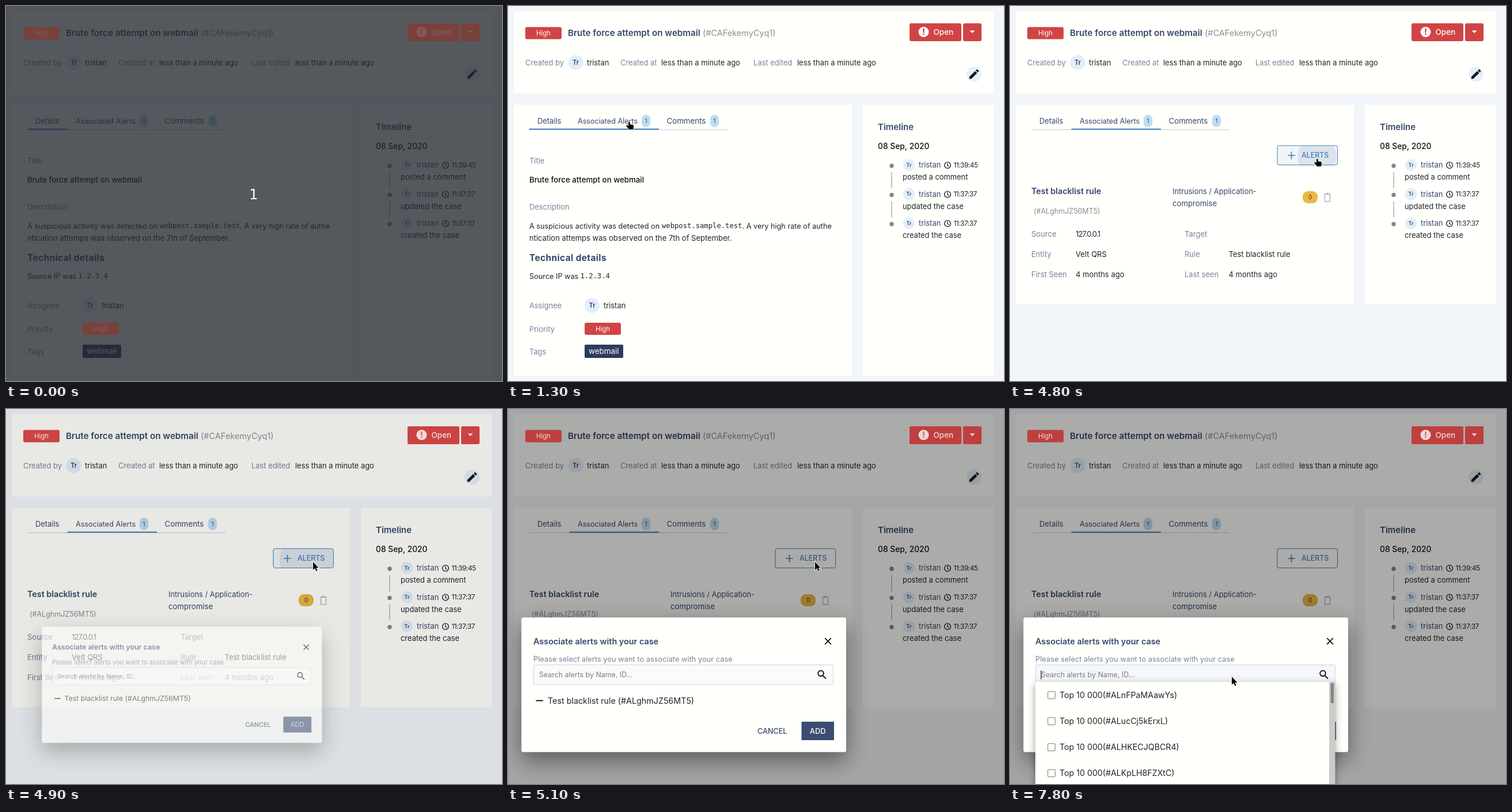
Write an HTML page with a canvas that moves like this. It is 861 px wide and 650 px high and loops after 8000 ms.

```html
<!DOCTYPE html>
<html lang="en">
<head>
<meta charset="utf-8">
<title>Case with associated alerts</title>
<style>
html, body { margin: 0; width: 100%; height: 100%; overflow: hidden; background: #f2f5f9 }
canvas { display: block }
</style>
</head>
<body>
<canvas id="stage" width="861" height="650"></canvas>
<script>
const c = document.getElementById('stage').getContext('2d');
const LOOP = 8000;
const NAVY = '#36476a', INK = '#20242c', GREY = '#78839a', BLUE = '#417fbf', RED = '#d04444',
      CARD = '#fffffc', PAGE = '#f2f5f9', USER = 'tristan', INITIALS = 'Tr';
const SANS = 'Inter, sans-serif', MONO = '"DejaVu Sans Mono", monospace';

const clamp = v => Math.min(1, Math.max(0, v));
const ramp = (t, from, to) => clamp((t - from) / (to - from));
const easeOut = p => 1 - (1 - p) ** 2;
const smooth = p => p * p * (3 - 2 * p);

// y is the middle of the capitals
function text(s, x, y, color = INK, size = 12.9, o = {}) {
  c.font = `${o.weight || 400} ${size}px ${o.font || SANS}`;
  c.letterSpacing = (o.spacing || 0) + 'px';
  c.textAlign = o.align || 'left';
  c.fillStyle = color;
  c.fillText(s, x, y + size * .36);
}
const centered = (s, x, y, color, size, weight) => text(s, x, y, color, size, { align: 'center', weight });

function box(x, y, w, h, fill, r = 0, stroke) {
  c.beginPath();
  c.roundRect(x, y, w, h, r);
  if (fill) { c.fillStyle = fill; c.fill(); }
  if (stroke) { c.strokeStyle = stroke; c.lineWidth = 1; c.stroke(); }
}
function disc(x, y, r, fill) {
  c.beginPath();
  c.arc(x, y, r, 0, 7);
  c.fillStyle = fill;
  c.fill();
}
function path(d, x, y, scale, fill, stroke, width = 1) {
  const p = new Path2D(d);
  c.save();
  c.translate(x, y);
  c.scale(scale, scale);
  if (stroke) { c.strokeStyle = stroke; c.lineWidth = width; c.stroke(p); }
  if (fill) { c.fillStyle = fill; c.fill(p); }
  c.restore();
}
function faded(alpha, draw) {
  if (alpha <= 0) return;
  c.save();
  c.globalAlpha *= alpha;
  draw();
  c.restore();
}
// a panel whose shadow falls only outside it, so it stays clean while translucent
function raised(x, y, w, h, r, blur, dy, alpha) {
  c.save();
  c.beginPath();
  c.rect(-400, -400, 1700, 1500);
  c.roundRect(x, y, w, h, r);
  c.clip('evenodd');
  c.shadowColor = `rgba(0,0,0,${alpha})`;
  c.shadowBlur = blur;
  c.shadowOffsetY = dy;
  box(x, y, w, h, CARD, r);
  c.restore();
  box(x, y, w, h, CARD, r);
}
function ripple(x, y, r, area, alpha) {
  faded(alpha, () => {
    c.beginPath();
    c.rect(...area);
    c.clip();
    disc(x, y, r, '#7890ad');
  });
}

function avatar(x, y, r) {
  disc(x, y, r, '#e2effa');
  centered(INITIALS, x, y, NAVY, r * .86, 600);
}
function badge(x, y) {
  box(x, y, 63, 21, RED, 3);
  centered('High', x + 31.5, y + 10.5, '#fff', 11.4);
}

function statusBits() {
  badge(30, 36.5);
  box(697, 30, 90, 31, RED, 3);
  box(790, 30, 32, 31, RED, 3);
  disc(721.5, 45, 9, '#fff');
  centered('!', 721.5, 45, RED, 14, 800);
  text('Open', 738.5, 45, '#fff', 13.5, { weight: 500 });
  path('M-4.5-2H4.5L0 2.6Z', 806, 44.5, 1, '#fff');
}

function header() {
  box(10, 9, 833, 143, CARD);
  statusBits();
  text('Brute force attempt on webmail', 104, 47, NAVY, 15.2, { weight: 600 });
  text('(#CAFekemyCyq1)', 338, 47, '#8b8e95', 14.5);
  text('Created by', 30, 98, GREY);
  avatar(117.5, 98, 13);
  text(USER, 137, 98);
  text('Created at', 195, 98, GREY);
  text('less than a minute ago', 266, 98);
  text('Last edited', 426, 98, GREY);
  text('less than a minute ago', 502, 98);
  disc(809, 118, 13, '#e4f0fa');
  path('M3 17.25V21h3.75L17.81 9.94 14.06 6.19ZM20.71 7.04a1 1 0 0 0 0-1.41l-2.34-2.34a1 1 0 0 0-1.41 0l-1.83 1.83 3.75 3.75Z',
    798, 107, .92, '#15181d');
}

function timeline(bottom) {
  box(616, 171, 227, bottom - 171, CARD);
  text('Timeline', 642, 210, NAVY, 15, { weight: 600 });
  text('08 Sep, 2020', 642, 243, '#111', 13.8, { weight: 500 });
  [['11:39:45', 'posted a comment'], ['11:37:37', 'updated the case'], ['11:37:37', 'created the case']]
    .forEach(([time, what], i) => {
      const y = 275.5 + i * 50.5;
      disc(666, y + 1.5, 3.7, '#85868a');
      if (i < 2) box(665.2, y + 12.5, 1.6, 28, '#b4b6ba');
      avatar(696, y, 10.3);
      text(USER, 713, y, NAVY);
      c.beginPath();
      c.arc(763, y + .5, 5.4, 0, 7);
      c.moveTo(763, y - 3);
      c.lineTo(763, y + 1);
      c.lineTo(765.5, y + 2.5);
      c.lineWidth = 1.4;
      c.strokeStyle = INK;
      c.stroke();
      text(time, 773.5, y, INK, 12, { spacing: -.55 });
      text(what, 685, y + 21);
    });
}

function tabs(t) {
  text('Details', 51, 199, NAVY);
  text('Associated Alerts', 121, 199, NAVY, 12.6);
  text('Comments', 275.5, 199, NAVY, 13.3);
  for (const x of [239.5, 358.5]) {
    box(x - 7.7, 188.5, 15.4, 21.5, '#bfddf3', 7.7);
    centered('1', x, 199, NAVY, 10);
  }
  box(37, 214, 344, 1, '#c3cddb');
  faded(1 - ramp(t, 1700, 2000), () => box(37, 212.5, 69.5, 2, BLUE));
  faded(ramp(t, 1100, 1300), () => box(106.5, 212.5, 155.5, 2, BLUE));
  if (t >= 1800) ripple(212, 204, 20 + (t - 1800) * .3, [107, 185, 155, 27], .2 * (1 - ramp(t, 1800, 2300)));
}

function details() {
  text('Title', 37, 268, GREY);
  text('Brute force attempt on webmail', 37, 301, '#111', 13.3, { weight: 500 });
  text('Description', 37, 348, GREY);
  text('A suspicious activity was detected on', 37, 381, INK, 12.7);
  text('webpost.sample.test', 267, 381, INK, 12.2, { font: MONO });
  text('. A very high rate of authe', 406.5, 381, INK, 12.7);
  text('ntication attemps was observed on the 7th of September.', 37, 402, INK, 13);
  text('Technical details', 37, 436, NAVY, 15.5, { weight: 700, spacing: .35 });
  text('Source IP was', 37, 468, INK, 12.7);
  text('1.2.3.4', 125.5, 468, INK, 12.2, { font: MONO });
  text('Assignee', 37, 519, GREY);
  avatar(146, 519, 13);
  text(USER, 166, 519);
  text('Priority', 37, 560, GREY);
  badge(133, 549);
  text('Tags', 37, 599, GREY);
  box(133, 587, 67, 23, '#2d3b5c', 2);
  text('webmail', 140, 598.5, '#fff', 13.4);
}

function alertsButton(t) {
  const hover = t >= 4400 && t < 5100;
  box(464, 242, 104.5, 33.5, hover ? '#f3f4f7' : CARD, 3, BLUE);
  if (t >= 4700)
    ripple(533, 261, 10 + ramp(t, 4700, 5000) * 72, [464.5, 242.5, 103.5, 32.5], .17 * (1 - ramp(t, 4900, 5100)));
  path('M-6.5 0H6.5M0-6.5V6.5', 488.5, 259, 1, null, BLUE, 1.7);
  text('ALERTS', 506, 259, BLUE, 12.4, { weight: 500 });
}

function alerts(t) {
  alertsButton(t);
  text('Test blacklist rule', 37, 321, NAVY, 14.3, { weight: 600 });
  text('(#ALghmJZ56MT5)', 41, 355.5, '#8b8e95', 12.5);
  text('Intrusions / Application-', 282, 321, NAVY);
  text('compromise', 282, 342, NAVY, 13.2);
  box(508, 321, 26, 21, '#e8b944', 9);
  centered('0', 521, 331.5, '#4a3a10', 10.5);
  path('M-4.5-4.5V7H4.5V-4.5M-6-5.5H6M-2.5-7H2.5', 551, 331.8, 1, null, '#b5b8be', 1.5);
  const rows = [
    ['Source', '127.0.0.1', 'Target', ''],
    ['Entity', 'Velt QRS', 'Rule', 'Test blacklist rule'],
    ['First Seen', '4 months ago', 'Last seen', '4 months ago']
  ];
  rows.forEach((row, i) => row.forEach((s, j) =>
    text(s, [37, 114, 303, 379.5][j], 395.5 + i * 34.7, j % 2 ? INK : GREY, 13,
      { spacing: s === '127.0.0.1' ? -.8 : 0 })));
}

function dialog(t) {
  const e = easeOut(ramp(t, 4800, 5100)), s = .69 + .31 * e;
  faded(e, () => {
    c.translate(305.5, 478.5);
    c.scale(s, s);
    c.translate(-305.5, -478.5);
    raised(23.5, 361.5, 563.5, 233, 3, 38, 15, .45);
    text('Associate alerts with your case', 44, 402.5, NAVY, 14.4, { weight: 600 });
    path('M-5.3-5.3 5.3 5.3M5.3-5.3-5.3 5.3', 555.5, 402.5, 1, null, '#15181d', 1.9);
    text('Please select alerts you want to associate with your case', 44, 433, GREY, 12.85);
    box(44.5, 443.5, 520, 34, t >= 7300 ? '#f4f7fa' : '#fafbfa', 1, '#cfd4db');
    text('Search alerts by Name, ID...', 54, 460.5, '#787d86', 12.4);
    c.beginPath();
    c.arc(543, 458.3, 4.8, 0, 7);
    c.moveTo(546.5, 462);
    c.lineTo(552, 467.5);
    c.strokeStyle = '#15181d';
    c.lineWidth = 2;
    c.stroke();
    box(48.5, 504.5, 12.5, 2, '#15181d');
    text('Test blacklist rule (#ALghmJZ56MT5)', 69, 505.5, INK, 14.3);
    text('CANCEL', 433, 558, NAVY, 12.6, { weight: 500 });
    box(509.5, 542, 56.5, 32, '#3b4d70', 1);
    centered('ADD', 537.7, 558, '#fff', 13, 500);
  });
}

function dropdown() {
  box(53.5, 453, 1.2, 15.5, '#111');
  raised(44, 473, 520, 190, 0, 12, 4, .4);
  box(554, 473, 10.5, 180, '#cbcbc9');
  box(556.7, 475, 5.3, 35, '#858585', 2);
  ['ALnFPaMAawYs', 'ALucCj5kErxL', 'ALHKECJQBCR4', 'ALKpLH8FZXtC'].forEach((id, i) => {
    const y = 496 + i * 45.1;
    box(65.7, y - 6.3, 12.6, 12.6, CARD, 1, '#777');
    text(`Top 10 000(#${id})`, 86, y, INK, 14.2);
  });
}

// time, x, y of the pointer tip
const moves = [[700, 422, 590], [1000, 218, 223], [1100, 218, 223], [1300, 210, 201], [3900, 210, 201],
  [4000, 259, 214], [4100, 259, 214], [4500, 533, 265], [6800, 533, 265], [7400, 385, 464], [LOOP, 385, 464]];

function pointer(t) {
  if (t < 700) return;
  const i = moves.findIndex(m => m[0] > t);
  const [t0, x0, y0] = moves[i - 1], [t1, x1, y1] = moves[i];
  const p = smooth(ramp(t, t0, t1)), x = x0 + (x1 - x0) * p, y = y0 + (y1 - y0) * p;
  const hand = t >= 1300 && t < 4000 || t >= 4400 && t < 4900;
  if (hand) path('M-1 1Q.5-1 2 1V4.5H6Q8 5 8 7V9L7 13H0L-5 6.5Q-3.5 4.5-1 7Z', x, y, 1, '#000', '#fff', 1.6);
  else if (t >= 7300 && t < 7800) path('M-3-7H3M0-7V7M-3 7H3', x, y + 3, 1, null, '#000', 1.3);
  else path('M0 0V14L3.3 11 5.6 16 7.6 15 5.5 10.2H9.6Z', x, y, 1, '#000', '#fff', 1.6);
}

function countdown() {
  box(0, 0, 861, 650, 'rgba(34,40,48,.77)');
  faded(.38, () => {
    for (const b of [[30, 36.5, 63, 21], [133, 549, 63, 21], [697, 30, 90, 31], [790, 30, 32, 31]]) box(...b, '#c8604a', 3);
  });
  text('1', 430, 326.5, '#fff', 24, { font: '"DejaVu Sans", sans-serif', align: 'center' });
}

function draw(t) {
  const bottom = t < 2100 ? 641 : 517;
  box(0, 0, 861, 650, PAGE);
  header();
  box(10, 171, 587, bottom - 171, CARD);
  timeline(bottom);
  tabs(t);
  faded(1 - ramp(t, 1700, 2100), details);
  faded(ramp(t, 2000, 2500), () => alerts(t));
  if (t < 100) countdown();
  if (t > 4800) {
    box(0, 0, 861, 650, `rgba(0,0,0,${.33 * ramp(t, 4800, 5100) ** 1.2})`);
    faded(.75, statusBits);
    dialog(t);
  }
  if (t >= 7800) dropdown();
  pointer(t);
}

// the picture advances in tenths of a second
function tick() {
  draw(Math.floor(performance.now() % LOOP / 100) * 100);
  requestAnimationFrame(tick);
}
tick();
</script>
</body>
</html>
```
